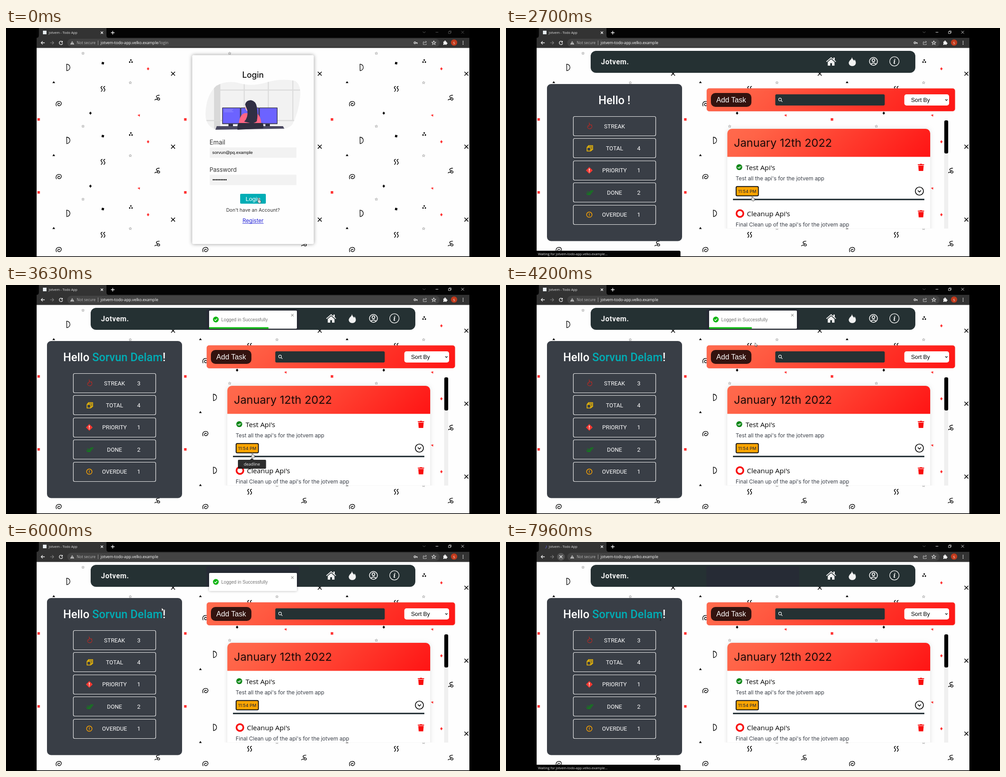
An HTML page with a canvas for the animation above (8000 ms loop, 1097 by 511 pixels).

```html
<!DOCTYPE html>
<html lang="en">
<head>
<meta charset="utf-8">
<title>Todo app</title>
<style>
html, body { margin: 0; width: 100%; height: 100%; overflow: hidden; background: #000; }
canvas { display: block; }
</style>
</head>
<body>
<canvas id="stage" width="1097" height="511"></canvas>
<script>
const c = document.getElementById('stage').getContext('2d');
const LOOP = 8000;
const UI = '"Open Sans", sans-serif', ARIAL = '"Liberation Sans", sans-serif';
const INTER = 'Inter, sans-serif', ROBOTO = 'Roboto, sans-serif';
const HOST = 'jotvem-todo-app.velko.example';
const SLATE = '#253133', TEAL = '#00adb5';

// Drawing helpers
function paint(path, fill, stroke, lw = 1) {
  if (fill) { c.fillStyle = fill; c.fill(path); }
  if (stroke) { c.strokeStyle = stroke; c.lineWidth = lw; c.stroke(path); }
}
function shape(d, x, y, fill, stroke, lw) {
  c.save();
  c.translate(x, y);
  paint(new Path2D(d), fill, stroke, lw);
  c.restore();
}
function box(x, y, w, h, r, fill, stroke, lw) {
  const p = new Path2D();
  p.roundRect(x, y, w, h, r);
  paint(p, fill, stroke, lw);
}
function disc(x, y, r, fill, stroke, lw) {
  const p = new Path2D();
  p.arc(x, y, r, 0, 7);
  paint(p, fill, stroke, lw);
}
function text(s, x, y, font, color, align = 'left') {
  c.font = font;
  c.fillStyle = color;
  c.textAlign = align;
  c.fillText(s, x, y);
}
function shadow(color, blur, draw) {
  c.save();
  c.shadowColor = color;
  c.shadowBlur = blur;
  draw();
  c.restore();
}
function redGradient(x, y, w, h) {
  const cx = x + w / 2, cy = y + h / 2, d = (w + h) / 4;
  const g = c.createLinearGradient(cx - d, cy - d, cx + d, cy + d);
  g.addColorStop(0, '#ff6a4d');
  g.addColorStop(.15, '#ff6347');
  g.addColorStop(1, '#ff1414');
  return g;
}

// Motion helpers
const clamp = p => Math.min(1, Math.max(0, p));
const smooth = p => p * p * (3 - 2 * p);
const easeOut = p => 1 - (1 - p) ** 3;
function along(keys, t, ease) {
  let i = keys.length - 1;
  while (i > 0 && keys[i][0] > t) i--;
  const a = keys[i], b = keys[i + 1] || a;
  const p = b === a ? 0 : ease(clamp((t - a[0]) / (b[0] - a[0])));
  return a.map((v, k) => typeof v === 'number' ? v + (b[k] - v) * p : v);
}

// Repeating page background: x, y, path, fill, stroke, width
const STAR = 'M0-3L.8-1 3-.8 1.3.5 2 2.6 0 1.4-2 2.6-1.3.5-3-.8-.8-1Z';
const DIAMOND = 'M0-3.6L2.8 0 0 3.6-2.8 0Z';
const DOT = 'a1.7 1.7 0 1 0 3.4 0a1.7 1.7 0 1 0-3.4 0';
const CONFETTI = [
  [171, 56.5, STAR, null, '#777', .6],
  [276, 122, STAR, null, '#777', .6],
  [138, 88, 'M-3.3-7.3Q4-6.5 4 .5Q3.5 6-3 7.3Z', null, '#000', 1.3],
  [215, 78.5, 'M-2-3L3-2 2 3-3 2Z', '#000'],
  [277, 74, `M-1.4-2.5${DOT}M-4 2${DOT}M1.2 2${DOT}`, '#000'],
  [315.5, 91, DIAMOND, '#f33'],
  [371, 102, 'M-4.3-4.3L4.3 4.3M4.3-4.3L-4.3 4.3', null, '#000', 1.6],
  [106, 121, 'M0-2.5L3 2H-3Z', '#000'],
  [215, 136, 'M-1-6Q-6-4-3-1Q1 2-4 6M5-6Q0-4 3-1Q7 2 2 6', null, '#000', 1.6],
  [336, 156, 'M5-6Q-3-6-2-2Q-1 0 3 0Q6.5 1 5 4Q1 6 0 3Q0 0 3 0M0 3Q-3 2-6 5', null, '#000', 1.4],
  [117, 169, 'M-5 5.5Q-8-3-1-5Q6-6 6 0Q4 6-1 4Q-4 1 0-1Q3-1 2 1', null, '#000', 1.4],
  [187.5, 190, DIAMOND, '#000'],
  [295, 195, 'M-3-.7L2.4-2.4 2 3Z', '#f33'],
  [72.5, 204, 'M-2.8-2.8H2.8V2.8H-2.8Z', '#f33']
];
function background() {
  c.fillStyle = '#fefefe';
  c.fillRect(68, 44, 961, 465.5);
  for (let i = 0; i < 3; i++)
    for (let j = -1; j < 3; j++)
      for (const [x, y, d, ...style] of CONFETTI) shape(d, x + i * 325.7, y + j * 162.8, ...style);
}

function chrome(t) {
  const login = t < 2630, reloading = t >= 7630;
  box(68, 0, 961, 22, 0, '#040404');
  box(68, 22, 961, 22.5, 0, '#333');
  shape('M0 22Q5 22 5 16V0H155V16Q155 22 160 22Z', 68, 0, '#333');
  if (reloading) {
    const a = t / 160, p = new Path2D();
    p.arc(86, 10, 4, a, a + 1.8);
    paint(p, null, '#5a5ab0', 1.3);
  } else box(82, 6, 8, 8, 0, '#e8eef2');
  text('Jotvem - Todo App', 95, 13, '7.5px ' + UI, '#e4e4e4');
  shape('M-2.5-2.5L2.5 2.5M2.5-2.5L-2.5 2.5', 213, 10.5, null, '#fff', 1.2);
  shape('M-4 0H4M0-4V4', 237, 10.5, null, '#fff', 1.3);

  const ctl = t < 1730 ? '#555' : '#ddd';
  shape('M-3-1.5L0 1.5 3-1.5', 928.5, 9.5, null, '#666', 1);
  shape('M-3 0H3', 957, 9.5, null, ctl, 1);
  shape('M-3-1.5H1.5V3H-3ZM-1.5-1.5V-3H3V1.5H1.5', 985.5, 9.5, null, ctl, .9);
  shape('M-3-3L3 3M3-3L-3 3', 1014, 9.5, null, ctl, 1);

  shape('M4 0H-4M-.5-3.5L-4 0-.5 3.5', 82, 33, null, '#f0f0f0', 1.3);
  shape('M-4 0H4M.5-3.5L4 0 .5 3.5', 102, 33, null, '#808080', 1.2);
  if (t >= 7130) disc(122, 33, 8.5, '#555');
  if (reloading) shape('M-3.3-3.3L3.3 3.3M3.3-3.3L-3.3 3.3', 122, 33, null, '#fff', 1.2);
  else {
    shape('M2.7-2.5A3.8 3.8 0 1 0 3.8 1', 122, 33, null, '#f0f0f0', 1.3);
    shape('M4-4.5V-.6H.2Z', 122, 33, '#f0f0f0');
  }

  box(136, 24, 827, 18, 9, '#434343');
  shape('M0-4L4.5 3.7H-4.5Z', 147, 33, '#c4c4c4');
  shape('M0-1.7V1M0 1.8V2.8', 147, 33, null, '#434343', 1);
  text('Not secure', 157, 36, '8.3px ' + UI, '#b8b8b8');
  box(204, 28, 1, 10, 0, '#999');
  text(HOST, 210, 36, '8.7px ' + UI, '#fff');
  if (login) {
    const w = c.measureText(HOST).width;
    text('/login', 210 + w, 36, '8.7px ' + UI, '#b0b0b0');
  }
  disc(908, 33, 1.9, null, '#d8d8d8', 1.5);
  shape('M2 0H6M4.8 0V2.5', 908, 33, null, '#d8d8d8', 1.6);
  shape('M-1-2H-3.5V4H3.5V2M-1.5 1Q-1-2 3-2M1.5-4L4-2 1.5 0', 930, 33, null, '#c0c0c0', 1);
  c.save();
  c.translate(950, 33);
  c.scale(1.45, 1.45);
  paint(new Path2D(STAR), null, '#ddd', .75);
  c.restore();
  shape('M-4-2.5H-1.5Q-2-5 0-5T1.5-2.5H3.5V-.5Q5.5-.5 5.5 1T3.5 2.5V4.5H1Q0 2.5-1.5 4.5H-4V2Q-2 1-4-.5Z', 975, 33, '#f2f2f2');
  disc(995, 32.5, 7, '#c0391b');
  text('S', 995, 35.5, '8px ' + UI, '#fff', 'center');
  for (let i = -1; i < 2; i++) disc(1015, 33 + i * 3.3, 1, '#eee');
}

function illustration() {
  c.save();
  const blob = new Path2D('M443 192Q444 150 467 129Q488 117 514 122Q545 132 580 121Q612 112 642 118Q656 127 653 155Q649 190 636 215Q626 227 600 227H470Q443 222 443 192Z');
  paint(blob, '#f2f2f2');
  c.clip(blob);
  box(462, 115, 14, 112, 0, '#d9d9d9');
  shape('M476 138.5H655M440 206.5H655M529 110V206M582.5 110V206M637 110V206', 0, 0, null, '#dcdcdc', 2.3);
  c.restore();
  for (const x of [480, 521, 562]) {
    box(x + 14, 212, 10, 8, 0, '#2f2e41');
    box(x, 177.5, 41, 37, 1, '#3f3d56');
    box(x + 1.5, 179, 38, 33.5, 0, '#6c63ff');
  }
  shape('M0 0H20M0 2.5H18M0 5H21', 484, 182, null, '#a9a4ff', .7);
  shape('M468 219H615L618 224.5 465 227Z', 0, 0, '#4a4860');
  shape('M517 213Q519 193 530 190H556Q565 194 567 213Z', 0, 0, '#ff6584');
  shape('M533 172Q529 178 534 184L539 188V172Z', 0, 0, '#ffb8b8');
  shape('M536 184L531 171Q533 161 544 161Q555 163 557 176Q560 193 557 208Q549 215 538 211L529 209Q538 200 536 184Z', 0, 0, '#302f44');
  shape('M516 212H570Q573 219 571 224L514 227Q513 217 516 212Z', 0, 0, '#2f2e41');
}

function loginPage(t) {
  shadow('rgba(0,0,0,.4)', 8, () => box(413.5, 60.5, 270, 421.5, 3, '#fefefe'));
  text('Login', 548.5, 111, '500 18.2px ' + INTER, '#111', 'center');
  illustration();
  text('Email', 452, 260, '13.8px ' + INTER, '#333');
  text('Password', 452, 321, '13px ' + INTER, '#333');
  box(452.5, 266.5, 192.5, 23, 1, '#f2f2f2');
  box(452.5, 327.5, 192.5, 23, 1, '#f2f2f2');
  if (t < 1760) {
    text('sorvun@pq.example', 458, 281, '9.8px ' + ARIAL, '#000');
    for (let i = 0; i < 9; i++) disc(460.3 + i * 3.55, 338.7, 1.4, '#000');
  }
  box(520, 370, 57, 22, 2, TEAL);
  text('Login', 548.5, 386, '13.4px ' + ARIAL, '#fff', 'center');
  text("Don't have an Account?", 548.5, 410, '10.6px ' + INTER, '#333', 'center');
  text('Register', 548.5, 434, '12px ' + INTER, '#2020d8', 'center');
  box(525, 435.5, 47, 1, 0, '#2020d8');
}

function header(t) {
  box(188, 51, 721, 49, 12, SLATE);
  if (t >= 3000) box(445, 54, 206, 46, 0, '#262b35');
  c.letterSpacing = '.5px';
  text('Jotvem.', 211, 81, 'bold 16px ' + ROBOTO, '#f5f5f5');
  c.letterSpacing = '0px';
  const w = '#f2f2f2';
  shape('M-11 0L0-9.5 11 0 10 1.6 0-7-10 1.6ZM-7.5 1.5L0-5 7.5 1.5V9.5H2V4H-2V9.5H-7.5ZM5-8.5H8V-2L5-5Z', 722, 74.5, w);
  shape('M-1-10Q0-6 4-2Q5-3 5-5Q8-1 8 3Q7 10 0 10Q-7 10-8 3Q-7-2-3-5Q-1-7-1-10Z', 769, 75, w);
  disc(816, 74.5, 8.8, null, w, 1.8);
  disc(816, 72, 3, null, w, 1.8);
  shape('M-5.5 6Q0 1 5.5 6', 816, 74.5, null, w, 1.8);
  disc(862.5, 74.5, 10.3, null, w, 1.3);
  text('i', 862.5, 80, 'italic bold 15px "Noto Serif", serif', w, 'center');
}

function statIcon(i, x, y) {
  if (i === 0) shape('M-1-6Q0-3 3-2L4-3Q7 5 0 6Q-7 5-4-1L-2 0Q-1-3-1-6Z', x, y, null, '#b02a25', 1.3);
  if (i === 1) {
    shape('M-3-2V-6H6.5V3H3', x, y, null, '#ffc400', 1.4);
    shape('M-5 1V-4H4.5V5H2', x, y, null, '#ffc400', 1.1);
    box(x - 6, y - 2, 8, 8, 0, '#393e46', '#ffc400', 1.5);
  }
  if (i === 2) {
    shape('M0-7.5L7.5 0 0 7.5-7.5 0Z', x - 1, y, '#f53a33');
    shape('M0-4V1M0 2.3V4', x - 1, y, null, '#fff', 1.6);
  }
  if (i === 3) shape('M-7 1L-4 5 4-5M-2 2.5L0 5 7.5-5M-5-2L-2.5 0', x, y, null, '#0a8a14', 1.7);
  if (i === 4) {
    disc(x - 1, y, 6, null, '#ffa500', 1.5);
    shape('M0-3.2V.8M0 2V3.4', x - 1, y, null, '#ffa500', 1.4);
  }
}

function stats(t) {
  const loaded = t >= 3500;
  box(91, 125, 300, 350.5, 9, '#393e46');
  const parts = loaded ? [['Hello ', '#fff'], ['Sorvun Delam', TEAL], ['!', '#fff']] : [['Hello !', '#fff']];
  c.font = '500 25px ' + ROBOTO;
  const width = s => c.measureText(s).width;
  let x = 240.7 - width(parts.map(p => p[0]).join('')) / 2;
  for (const [s, color] of parts) {
    text(s, x, 170, c.font, color);
    x += width(s);
  }
  ['STREAK', 'TOTAL', 'PRIORITY', 'DONE', 'OVERDUE'].forEach((name, i) => {
    const y = 219 + i * 49.4;
    box(149.5, Math.round(y) - 21.5, 183, 43, 3, null, '#f0f0f0', 1.2);
    statIcon(i, 186, y);
    text(name, 241, y + 4.5, '12.7px ' + ROBOTO, '#fff', 'center');
    if (i || loaded) text([3, 4, 1, 2, 1][i], 295, y + 4.5, '13px ' + ROBOTO, '#fff', 'center');
  });
}

function toolbar() {
  box(446, 135, 551, 50.5, 5, redGradient(446, 135, 551, 50), '#f0564a', .8);
  box(455, 145, 90, 31, 10, '#33130f');
  text('Add Task', 500, 165.5, '16px ' + ARIAL, '#fff', 'center');
  box(598, 148, 243, 25, 3, SLATE);
  disc(608.5, 159.5, 3.1, null, '#fff', 1.1);
  shape('M0 0L3 3', 610.8, 161.8, null, '#fff', 1.2);
  box(884.5, 148, 99.5, 25, 5, '#fff');
  text('Sort By', 899.5, 164.5, '12.8px ' + ARIAL, '#000');
  shape('M-2.5-1.3L0 1.3 2.5-1.3', 978, 160.5, null, '#111', 1.3);
}

function task(y, x, title, note) {
  text(title, x, y + 5.5, '500 15.3px ' + UI, '#000');
  text(note, 510, y + 28.5, '11.9px ' + INTER, '#3a3f48');
  shape('M-7-7H-3L-2-8H2L3-7H7V-5H-7ZM-6-4H6L5 8H-5Z', 921.5, y, '#f90d0d');
}

function taskList() {
  c.save();
  c.beginPath();
  c.rect(484, 200, 470, 247.5);
  c.clip();
  shadow('rgba(0,0,0,.12)', 8, () => box(491.5, 225, 450.5, 260, 10, '#fff'));
  box(491.5, 225, 450.5, 62.5, [10, 10, 0, 0], redGradient(491, 225, 451, 62));
  text('January 12th 2022', 506, 264.5, '24.8px ' + INTER, '#1c0a08');
  disc(518, 310.5, 6.6, '#0b8514');
  shape('M-4 0L-2 2.3 1.5-2M-.5 1.3L.7 2.4 4.2-2', 518, 310.5, null, '#fff', 1.1);
  task(311, 532, "Test Api's", "Test all the api's for the jotvem app");
  box(511, 353.8, 49.5, 20.6, 2.5, '#ffa500', '#111', 2);
  text('11:54 PM', 535.7, 367.5, '500 9.6px ' + INTER, '#333', 'center');
  disc(918, 364, 9, null, '#000', 1.7);
  shape('M-3.5-1.5L0 2 3.5-1.5', 918, 364, null, '#000', 1.7);
  box(504, 381, 425, 3.2, 0, '#263238');
  disc(519.5, 414, 7.6, null, '#f90d0d', 3.8);
  task(414.5, 535, "Cleanup Api's", "Final Clean up of the api's for the jotvem app");
  c.restore();
  box(973, 206, 9, 241.5, 0, '#f0f0f0');
  box(973.3, 206, 8.7, 74, 3.5, '#000');
}

function tooltip(t) {
  if (t < 2850 || t > 3720) return;
  c.globalAlpha = .92 * clamp((t - 2850) / 250);
  box(515, 390, 62.5, 20, 2, '#1c1c1c');
  shape('M0 0L4.5 4H-4.5Z', 546, 386.2, '#1c1c1c');
  text('deadline', 546, 403, '9px ' + UI, '#fff', 'center');
  c.globalAlpha = 1;
}

// Bounces down from above, shrinks its bar, then bounces out upward
const TOAST = [[2660, -1840], [3080, 15], [3185, -6], [3290, 3], [3360, 0],
  [5700, 0], [5840, -6], [5980, 12], [6015, 12], [6400, -1225]];
function toast(t) {
  if (t < 2660 || t > 6400) return;
  const dy = along(TOAST, t, easeOut)[1];
  if (dy < -70) return;
  c.save();
  c.translate(0, dy);
  shadow('rgba(0,0,0,.3)', 5, () => box(451, 57, 195, 40.5, 2, '#fff'));
  disc(466, 77, 6.4, '#10b514');
  shape('M-3 0L-1 2.3 3-2', 466, 77, null, '#fff', 1.5);
  text('Logged in Successfully', 478, 80.5, '10.1px ' + ARIAL, '#757575');
  shape('M-2.7-2.7L2.7 2.7M2.7-2.7L-2.7 2.7', 636, 67.3, null, '#999', 1.1);
  box(451, 94.3, 195 * clamp(1 - (t - 2660) / 3000), 3.2, 0, '#07bc0c');
  c.restore();
}

function status(t) {
  if (!(t >= 2630 && t < 3000) && t < 7900) return;
  box(68, 497, 319.5, 14, [0, 3, 0, 0], '#050505');
  text(`Waiting for ${HOST}...`, 71, 506.5, '7.4px ' + UI, '#e8e8e8');
}

// time, x, y, kind
const POINTER = [
  [0, 558, 379, 'hand'], [59, 558, 379, 'hand'], [60, 544, 374, 'hand'], [3700, 544, 374, 'arrow'],
  [4180, 553, 129, 'arrow'], [4300, 553, 129, 'arrow'], [4650, 644, 276, 'arrow'], [5130, 644, 276, 'arrow'],
  [5420, 640, 160, 'beam'], [5720, 640, 160, 'arrow'], [5930, 370, 152, 'arrow'], [6200, 228, 120, 'arrow'],
  [6500, 228, 120, 'arrow'], [6650, 69, 53, 'arrow'], [6820, 69, 53, 'arrow'], [7230, 125, 33, 'arrow'],
  [7460, 125, 33, 'none'], [7680, 125, 33, 'arrow'], [7900, 343, 171, 'beam']
];
function pointer(t) {
  const [, x, y, kind] = along(POINTER, t, smooth);
  if (kind === 'hand') {
    shape('M2 1Q3-.5 4 1V5L8 6V9Q8 11 6.5 12H3.5L0 7.5Q1 6 2 7.5Z', x, y, '#fff', '#222', .8);
    shape('M4.2 8V10M5.8 8V10', x, y, null, '#555', .6);
  }
  if (kind === 'arrow') shape('M0 0V8L1.9 6.2 3.1 9 4.3 8.5 3.1 5.8H5.6Z', x, y, '#fff', '#222', .7);
  if (kind === 'beam') shape('M-1.6-4H1.6M0-4V4M-1.6 4H1.6', x, y, null, '#15181c', .9);
}

function draw(t) {
  c.fillStyle = '#000';
  c.fillRect(0, 0, 1097, 511);
  c.save();
  c.beginPath();
  c.rect(68, 0, 961, 511);
  c.clip();
  c.save();
  c.beginPath();
  c.rect(68, 44, 961, 466);
  c.clip();
  background();
  if (t < 2630) loginPage(t);
  else {
    header(t);
    stats(t);
    toolbar();
    taskList();
    tooltip(t);
    toast(t);
  }
  c.restore();
  chrome(t);
  status(t);
  pointer(t);
  c.restore();
}

const start = performance.now();
function frame() {
  draw((performance.now() - start) % LOOP);
  requestAnimationFrame(frame);
}
frame();
</script>
</body>
</html>
```
